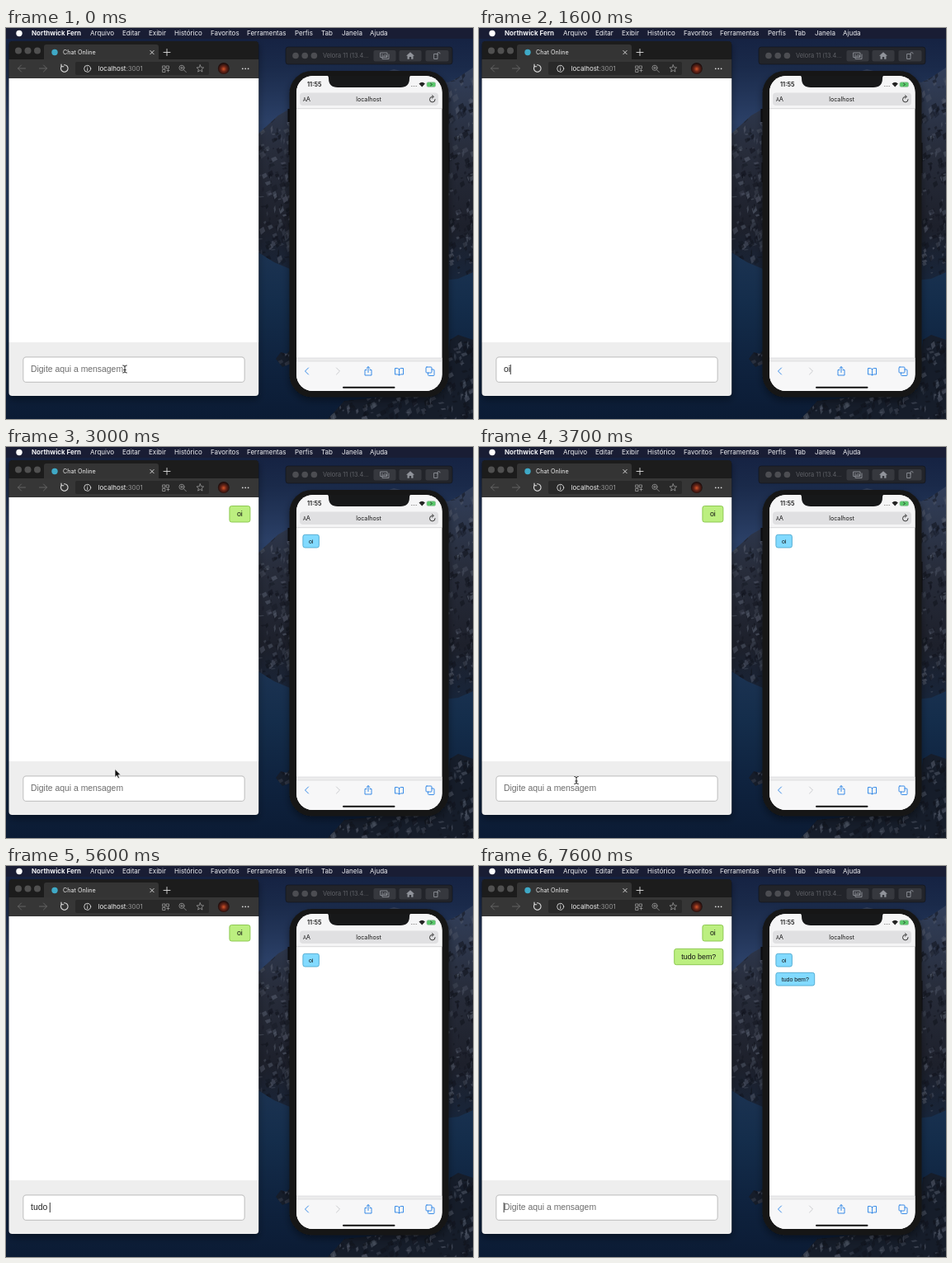
Recreate the animation shown at these times as an HTML page. Size 566 px wide and 474 px high, loop 8000 ms.

```html
<!DOCTYPE html>
<html lang="pt-BR">
<head>
<meta charset="utf-8">
<title>Chat Online</title>
<style>
html, body { margin: 0; width: 100%; height: 100%; overflow: hidden; background: #0d1930; }
svg { display: block; width: 100vw; height: 100vh; }
text { white-space: pre; }
.ui { font-family: Inter, Roboto, sans-serif; }
.web { font-family: "Liberation Sans", Arial, sans-serif; }
.mid { text-anchor: middle; }
.line { fill: none; stroke-linecap: round; stroke-linejoin: round; }
</style>
</head>
<body>
<svg viewBox="0 0 566 474">
  <defs>
    <linearGradient id="sky" x1="0" y1="0" x2="0" y2="1">
      <stop offset="0" stop-color="#142040"/><stop offset=".1" stop-color="#1a2a4a"/>
      <stop offset=".24" stop-color="#2b4067"/><stop offset=".56" stop-color="#1c3352"/>
      <stop offset=".7" stop-color="#142d4b"/><stop offset=".85" stop-color="#0f233f"/>
      <stop offset="1" stop-color="#0b1b34"/>
    </linearGradient>
    <linearGradient id="rock" x1="0" y1="0" x2="0" y2="1">
      <stop offset="0" stop-color="#323f5a"/><stop offset=".4" stop-color="#272c3a"/>
      <stop offset=".75" stop-color="#1d202b"/><stop offset="1" stop-color="#18253a"/>
    </linearGradient>
    <radialGradient id="photo" cx=".5" cy=".55">
      <stop offset="0" stop-color="#d2562a"/><stop offset=".45" stop-color="#6d2618"/>
      <stop offset="1" stop-color="#1c0d0c"/>
    </radialGradient>
    <filter id="shadow" x="-20%" y="-20%" width="140%" height="140%">
      <feDropShadow dx="0" dy="4" stdDeviation="5" flood-color="#000" flood-opacity=".4"/>
    </filter>
    <clipPath id="page"><rect x="3.5" y="16" width="302.7" height="430" rx="4"/></clipPath>
    <clipPath id="screen"><rect x="352" y="58" width="176.5" height="382" rx="20"/></clipPath>
    <clipPath id="hill">
      <path id="ridge" d="M306 128L318 117 330 106 344 98 400 74 470 50 536 66 548 60 566 48V296L548 304 530 306 400 300 344 292 325 284 306 272Z"/>
    </clipPath>
    <clipPath id="shore">
      <path id="bank" d="M327 401l6-8 7 2 5-5v17l-10 4zM390 474l20-22 60-6 60-6 8-62 10-6 18 6v96z"/>
    </clipPath>
  </defs>

  <rect width="566" height="474" fill="url(#sky)"/>
  <use href="#ridge" fill="url(#rock)"/>
  <use href="#bank" fill="#161d2a"/>
  <g id="hillStones" clip-path="url(#hill)"></g>
  <g id="shoreStones" clip-path="url(#shore)"></g>

  <rect width="566" height="13" fill="#191d34"/>
  <circle cx="16" cy="6.5" r="3.7" fill="#fff"/>
  <g id="menu" class="ui" font-size="8" fill="#f1f2f5"></g>

  <!-- browser -->
  <g filter="url(#shadow)"><rect x="3.5" y="16" width="302.7" height="430" rx="4" fill="#1b1b1b"/></g>
  <g clip-path="url(#page)">
    <path d="M46 39V23q0-3 3-3h133q3 0 3 3v16z" fill="#343434"/>
    <rect x="3" y="38" width="304" height="23" fill="#363636"/>
    <rect x="84" y="41" width="162" height="16" rx="2" fill="#292929"/>
    <rect x="3" y="61" width="304" height="320" fill="#fff"/>
    <rect x="3" y="381" width="304" height="66" fill="#eee"/>
  </g>
  <g fill="#505050"><circle cx="15" cy="27.5" r="4"/><circle cx="26.5" cy="27.5" r="4"/><circle cx="38" cy="27.5" r="4"/></g>
  <circle cx="59" cy="29.5" r="3.7" fill="#3fa9c6"/>
  <g class="ui">
    <text x="69" y="32.3" font-size="7.2" fill="#eee">Chat Online</text>
    <text x="111.7" y="52" font-size="7.9" fill="#f2f2f2">localhost<tspan fill="#949494">:3001</tspan></text>
  </g>
  <g class="line" stroke="#dedede" stroke-width=".9">
    <path d="M174.8 27.4l4.4 4.4m0-4.4l-4.4 4.4M191 29.5h8m-4-4v8"/>
    <g stroke="#686868"><path d="M23.5 49h-9m4-4l-4 4 4 4M40.5 49h9m-4-4l4 4-4 4"/></g>
    <path d="M67.5 46.2a4.3 4.3 0 1 0 3-1.500M67 44v2.700h2.800" stroke-width="1.1"/>
    <circle cx="98.7" cy="49.3" r="4"/><path d="M98.7 48.8v2.7m0-4.5v.1"/>
    <g stroke="#9a9a9a" stroke-width=".8">
      <path d="M190 46h3v3h-3zM194.500 46h3v3h-3zM190 50.500h3v3h-3zM195 51.500h3m-1.500-1.500v3"/>
      <circle cx="213" cy="48.3" r="3.1"/><path d="M215.3 50.6l3 3M211.6 48.3h2.8M213 46.9v2.8"/>
      <path d="M235.3 44.8l1.2 2.9 3.1.3-2.4 2 .8 3.1-2.7-1.7-2.7 1.7.8-3.1-2.4-2 3.1-.3z"/>
    </g>
  </g>
  <circle cx="263.8" cy="49" r="7" fill="url(#photo)"/>
  <g fill="#dedede"><circle cx="286.8" cy="49.3" r=".9"/><circle cx="290.2" cy="49.3" r=".9"/><circle cx="293.6" cy="49.3" r=".9"/></g>
  <rect x="20.8" y="398.8" width="268.4" height="30.6" rx="4" fill="#fff" stroke="#c6c6c6" stroke-width="1.2"/>
  <text id="field" class="web" x="30" y="417.2" font-size="10.4"></text>
  <rect id="caret" y="408" width=".9" height="12" fill="#222"/>

  <!-- simulator -->
  <rect x="339" y="23" width="202" height="21" rx="3" fill="#22242a" stroke="#10131a" stroke-width=".6"/>
  <g fill="#4c4d52"><circle cx="351" cy="33.5" r="3.8"/><circle cx="362.2" cy="33.5" r="3.8"/><circle cx="373.4" cy="33.5" r="3.8"/></g>
  <text class="ui" x="384" y="36.4" font-size="7.4" fill="#606268">Velora 11 (13.4...</text>
  <g fill="#36383e"><rect x="445.5" y="27" width="27" height="13.5" rx="2"/><rect x="476.5" y="27" width="27" height="13.5" rx="2"/><rect x="508.5" y="27" width="28" height="13.5" rx="2"/></g>
  <g class="line" stroke="#85888f">
    <path d="M454 30h8v5.5h-8zM456 32v5.5h8V32"/><circle cx="459.5" cy="34" r="1.5"/>
    <path d="M519 31.5h4v6h-4zM523 33v-2a1.5 1.5 0 0 1 3 0"/>
  </g>
  <path d="M485 33.8l5-4.6 5 4.6h-1.5v4h-2.3v-2.8h-2.4v2.8h-2.3v-4z" fill="#90939a"/>
  <path d="M341.5 98h3v16h-3zM342.5 130h2v24h-2zM342.5 163h2v24h-2zM535.5 139h2v37h-2z" fill="#0d0e12"/>
  <g filter="url(#shadow)"><rect x="343.5" y="52" width="193" height="395.5" rx="27" fill="#171819"/></g>
  <g clip-path="url(#screen)">
    <rect x="352" y="58" width="177" height="382" fill="#fff"/>
    <rect x="352" y="58" width="177" height="39.5" fill="#f5f5f6"/>
    <path d="M352 97.7h177" stroke="#c9c9cb" stroke-width=".7"/>
    <rect x="352" y="400" width="177" height="4" fill="#ececed"/>
    <rect x="352" y="404" width="177" height="36" fill="#f7f7f8"/>
    <path d="M352 400h177M352 404h177" stroke="#d2d2d4" stroke-width=".6"/>
    <path d="M387 57q4 0 4 4 0 11 11 11h76q11 0 11-11 0-4 4-4z" fill="#171819"/>
  </g>
  <rect x="356" y="78.5" width="168" height="15.5" rx="4" fill="#e0e0e2"/>
  <g class="ui" fill="#161616">
    <text x="365" y="71.2" font-size="7.3" font-weight="600">11:55</text>
    <text x="360" y="89" font-size="5.5">A<tspan font-size="7.5">A</tspan></text>
    <text class="mid" x="439.5" y="88.8" font-size="7.2">localhost</text>
  </g>
  <path d="M491 70.5h7" stroke="#8b8b8b" stroke-dasharray="1 1"/>
  <path d="M500.5 67.5q3.7-3.4 7.4 0l-3.7 4z" fill="#222"/>
  <rect x="510" y="65.8" width="10.5" height="5.5" rx="1.5" fill="#58c96a" stroke="#93b99a" stroke-width=".7"/>
  <path d="M514.5 67l2 1.5-2 1.5" class="line" stroke="#222" stroke-width=".7"/>
  <path d="M516.8 83.3a3.3 3.3 0 1 0 3.3 3.3M516.5 81.7l2 1.7-2 1.7" class="line" stroke="#222" stroke-width=".9"/>
  <g class="line" stroke="#2f86e6" stroke-width=".95">
    <path d="M366.5 412l-4 4 4 4"/><path d="M400.5 412l4 4-4 4" stroke="#c8c9cc"/>
    <path d="M437 414.5h-2v6.5h8v-6.5h-2M439 417.5v-6.8m-2.2 2l2.2-2 2.2 2"/>
    <path d="M476.5 413.5q-2-1.7-5-1v7.5q3-.7 5 .8 2-1.5 5-.8v-7.5q-3-.7-5 1zv7.3"/>
    <rect x="509" y="411" width="7" height="7" rx="1"/><path d="M511.5 418v2.5q0 1 1 1h5.5q1 0 1-1V415q0-1-1-1h-2"/>
  </g>
  <rect x="408" y="434.7" width="63.5" height="2" rx="1" fill="#111"/>

  <g id="bubbles" class="web" fill="#111"></g>

  <g id="beam" class="line">
    <path id="beamLine" d="M-2.300-4.500Q0-4.500 0-3 0-4.500 2.300-4.500M0-3V3M-2.300 4.500Q0 4.500 0 3 0 4.500 2.300 4.500M-1.200 1h2.400"/>
    <use href="#beamLine" stroke="#fff" stroke-width="1.9"/>
    <use href="#beamLine" stroke="#111" stroke-width=".9"/>
  </g>
  <path id="arrow" d="M0 0v10l2.3-2.1 1.6 3.5 1.6-.7-1.5-3.5H7.2z" fill="#111" stroke="#fff" stroke-width=".7"/>
</svg>
<script>
const LOOP = 8000, STEP = 100, FIELD_X = 30;
const $ = id => document.getElementById(id);
const NS = 'http://www.w3.org/2000/svg';

function add(parent, tag, attrs, text) {
  const el = document.createElementNS(NS, tag);
  for (const k in attrs) el.setAttribute(k, attrs[k]);
  if (text) el.textContent = text;
  parent.append(el);
}

const menu = [[31, 'Northwick Fern'], [102, 'Arquivo'], [141, 'Editar'], [173, 'Exibir'],
  [204, 'Histórico'], [248, 'Favoritos'], [292, 'Ferramentas'], [350, 'Perfis'],
  [382, 'Tab'], [407, 'Janela'], [441, 'Ajuda']];
menu.forEach(([x, label], i) =>
  add($('menu'), 'text', { x, y: 9.4, 'font-weight': i ? 400 : 700 }, label));

// rough rock texture
let seed = 7;
const rnd = () => (seed = seed * 16807 % 2147483647) / 2147483647;
function stones(layer, count, left, top, width, height) {
  for (let i = 0; i < count; i++) {
    const x = left + rnd() * width, y = top + rnd() * height;
    const w = 1 + rnd() * 5, h = 1 + rnd() * 5;
    add(layer, 'path', {
      d: `M${x} ${y}l${w} ${-h * .6} ${w * .4} ${h} ${-w} ${h * .8}z`,
      fill: rnd() < .6 ? '#10131c' : '#565d6d', opacity: .25 + rnd() * .4
    });
  }
}
stones($('hillStones'), 160, 304, 105, 40, 180);
stones($('hillStones'), 160, 534, 55, 32, 245);
stones($('shoreStones'), 80, 534, 375, 32, 99);
stones($('shoreStones'), 90, 390, 446, 150, 28);
stones($('shoreStones'), 8, 327, 390, 16, 18);

function bubble(at, x, y, w, h, size, fill, stroke, label) {
  const g = document.createElementNS(NS, 'g');
  add(g, 'rect', { x, y, width: w, height: h, rx: 2.5, fill, stroke, 'stroke-width': .9 });
  add(g, 'text', { x: x + w / 2, y: y + h / 2 + size * .34, 'font-size': size, class: 'mid' }, label);
  $('bubbles').append(g);
  return { at, g };
}
const green = ['#bcef80', '#86c548'], blue = ['#82daff', '#4fa9cf'];
const bubbles = [
  bubble(2100, 270.9, 71.5, 25, 19.5, 8.9, ...green, 'oi'),
  bubble(2200, 359.9, 106.3, 19.5, 15.7, 7, ...blue, 'oi'),
  bubble(7500, 236.7, 100.4, 59.2, 19.3, 8.9, ...green, 'tudo bem?'),
  bubble(7600, 359.9, 129.3, 46.8, 15.7, 7, ...blue, 'tudo bem?')
];

// [time, text in the field]; each edit restarts the caret blink
const edits = [[-800, ''], [1400, 'o'], [1600, 'oi'], [2100, ''], [4500, 't'], [4800, 'tu'],
  [5200, 'tud'], [5400, 'tudo'], [5600, 'tudo '], [5800, 'tudo b'], [6000, 'tudo be'],
  [6300, 'tudo bem'], [7000, 'tudo bem?'], [7500, '']];

// [time, x, y] of the pointer
const path = [[0, 144, 413.5], [1400, 144, 413.5], [2500, 142, 412], [3300, 126, 377.5],
  [3400, 126, 377.5], [3700, 118, 404], [3900, 109, 412], [4100, 105, 413.5]];

const pen = document.createElement('canvas').getContext('2d');
pen.font = '10.4px "Liberation Sans", Arial, sans-serif';

const show = (el, on) => el.setAttribute('visibility', on ? 'visible' : 'hidden');

function pointerAt(t) {
  const i = path.findIndex(p => p[0] > t);
  if (i < 0) return path.at(-1).slice(1);
  const [t0, x0, y0] = path[i - 1], [t1, x1, y1] = path[i];
  const k = (t - t0) / (t1 - t0);
  return [x0 + (x1 - x0) * k, y0 + (y1 - y0) * k];
}

function draw(t) {
  const [since, text] = edits.findLast(e => e[0] <= t);
  $('field').textContent = text || 'Digite aqui a mensagem';
  $('field').setAttribute('fill', text ? '#222' : '#6c6c6c');
  $('caret').setAttribute('x', FIELD_X - .3 + pen.measureText(text).width);
  show($('caret'), Math.floor((t - since) / 500) % 2 === 0);

  for (const { at, g } of bubbles) show(g, t >= at);

  const [x, y] = pointerAt(t);
  const visible = t < 1400 || (t >= 2600 && t < 4500);
  const inField = y >= 398;
  for (const id of ['beam', 'arrow']) $(id).setAttribute('transform', `translate(${x} ${y})`);
  show($('beam'), visible && inField);
  show($('arrow'), visible && !inField);
}

const start = performance.now();
function tick() {
  const t = (performance.now() - start) % LOOP;
  draw(Math.floor(t / STEP) * STEP);
  requestAnimationFrame(tick);
}
tick();
</script>
</body>
</html>
```
